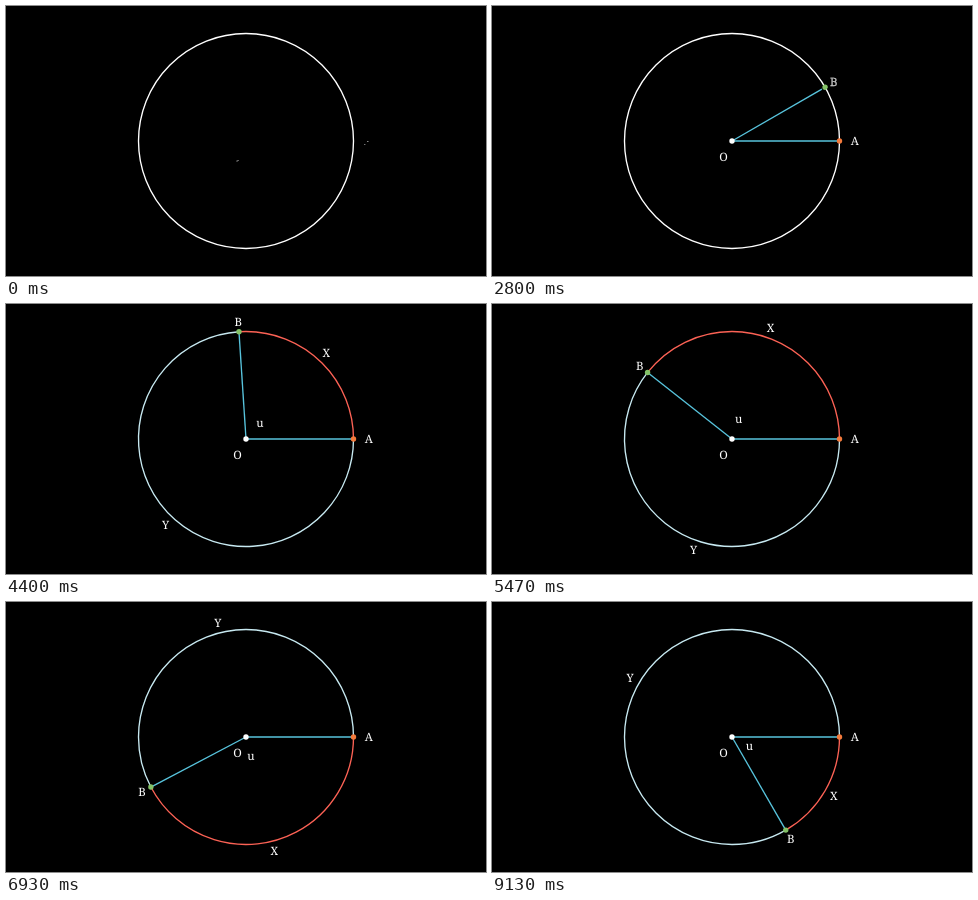
Write an HTML page with a canvas that moves like this. It is 480 px wide and 270 px high and loops after 9990 ms.

```html
<!DOCTYPE html>
<html lang="en">
<head>
<meta charset="utf-8">
<title>Major and minor arcs</title>
<style>
  html, body { margin: 0; height: 100%; overflow: hidden; background: #000; }
  canvas { display: block; }
</style>
</head>
<body>
<canvas id="stage" width="480" height="270"></canvas>
<script>
const ctx = document.getElementById('stage').getContext('2d');
const CX = 240, CY = 135, R = 107.5, LABEL_R = 117.6, ANGLE_R = 20.2;
const LOOP = 9990, FPS = 15;
const WHITE = '#fff', MINOR = '#fc6255', MAJOR = '#c7e9f1', BLUE = '#58c4dd';

const clamp = v => Math.min(1, Math.max(0, v));
const sigmoid = v => 1 / (1 + Math.exp(-v));
const smooth = v => {
  const low = sigmoid(-5);
  return clamp((sigmoid(10 * clamp(v) - 5) - low) / (1 - 2 * low));
};
const rad = deg => deg * Math.PI / 180;
const polar = (r, deg) => [CX + r * Math.cos(rad(deg)), CY - r * Math.sin(rad(deg))];

function stroke(color) {
  ctx.strokeStyle = color;
  ctx.lineWidth = 1.35;
  ctx.stroke();
}

function arc(from, to, color) {
  ctx.beginPath();
  ctx.arc(CX, CY, R, -rad(from), -rad(to), true);
  stroke(color);
}

function radius(deg, progress) {
  if (!progress) return;
  ctx.beginPath();
  ctx.moveTo(CX, CY);
  ctx.lineTo(...polar(R * progress, deg));
  stroke(BLUE);
}

function dot([x, y], color, progress) {
  if (!progress) return;
  ctx.beginPath();
  ctx.arc(x, y, 2.7, 0, -2 * Math.PI * progress, true);
  ctx.fillStyle = color;
  ctx.fill();
}

// Outlines the letter first, then fills it while the outline thins away.
function label(text, [x, y], progress = 1) {
  if (progress <= 0) return;
  const outline = clamp(progress * 2), fill = clamp(progress * 2 - 1);
  const baseline = y + (text === 'u' ? 3.1 : 4.1);
  ctx.fillStyle = ctx.strokeStyle = WHITE;
  if (fill < 1) {
    ctx.lineWidth = 0.7 * (1 - fill);
    ctx.setLineDash(outline < 1 ? [32 * outline, 999] : []);
    ctx.strokeText(text, x, baseline);
    ctx.setLineDash([]);
  }
  ctx.globalAlpha = fill;
  ctx.fillText(text, x, baseline);
  ctx.globalAlpha = 1;
}

function draw(t) {
  const angle = 30 + 270 * clamp((t - 3) / 6);
  const reflex = angle > 180;
  const first = smooth(t), second = smooth(t - 1), third = smooth(t - 2);

  ctx.fillStyle = '#000';
  ctx.fillRect(0, 0, 480, 270);
  ctx.font = '11.5px "Noto Serif", serif';
  ctx.textAlign = 'center';
  ctx.textRendering = 'geometricPrecision';

  label('O', [231.5, 151], clamp(t));
  label('A', [362.7, 135], clamp(t));
  label('B', polar(LABEL_R, angle), clamp(t - 2));

  if (t < 3) {
    arc(0, 360, WHITE);
  } else {
    const near = angle / 2, far = near + 180;
    arc(0, angle, reflex ? MAJOR : MINOR);
    arc(angle, 360, reflex ? MINOR : MAJOR);
    label('X', polar(LABEL_R, reflex ? far : near));
    label('Y', polar(LABEL_R, reflex ? near : far));
    label('u', polar(ANGLE_R, reflex ? far : near));
  }

  radius(0, second);
  radius(angle, third);
  dot([CX, CY], WHITE, first);
  dot(polar(R, 0), '#f47a3c', first);
  dot(polar(R, angle), '#83c167', third);
}

function tick() {
  const step = Math.floor((performance.now() % LOOP + 5) * FPS / 1000);
  draw(step / FPS + 1 / 60);
  requestAnimationFrame(tick);
}
tick();
</script>
</body>
</html>
```
